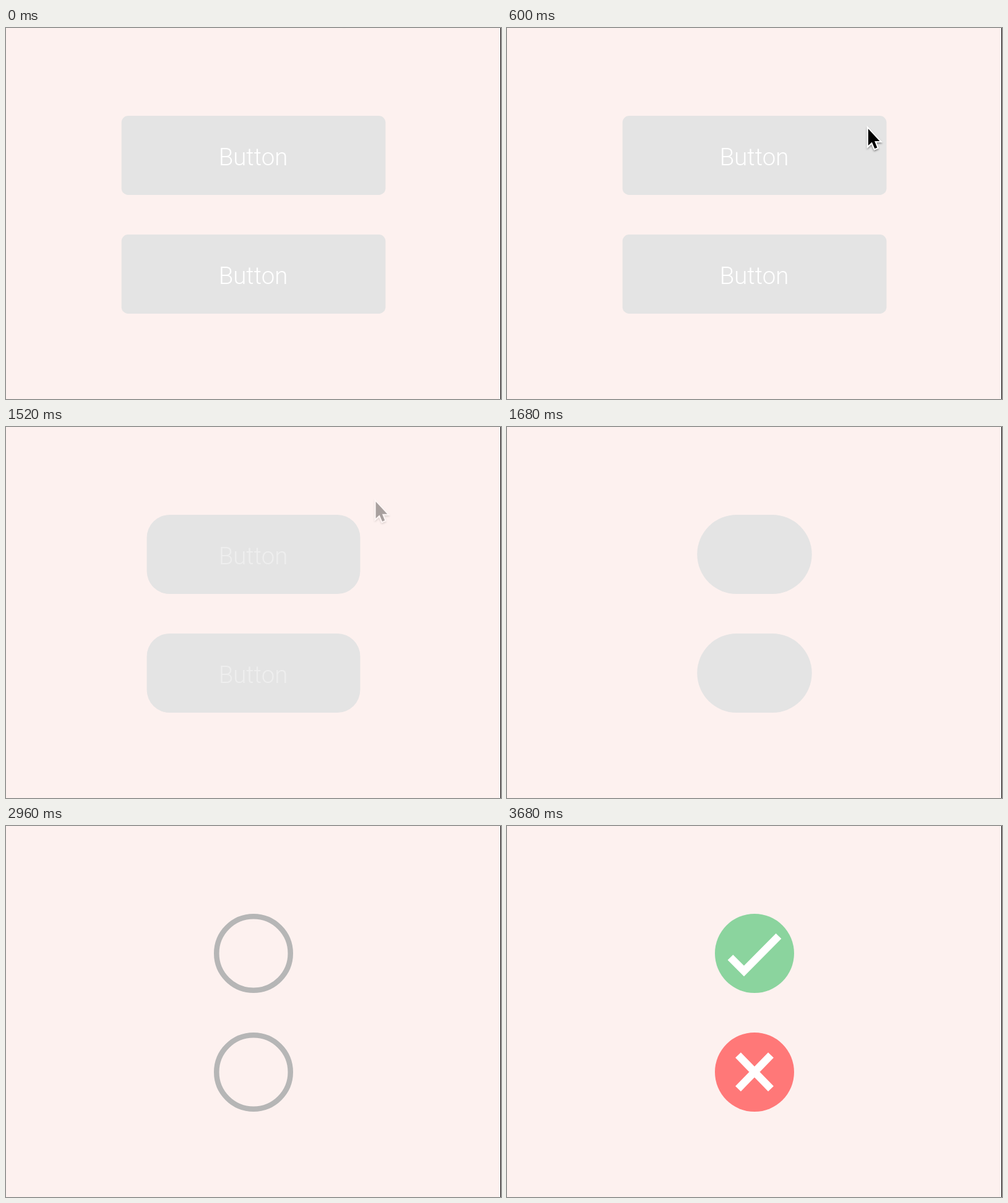
These frames come from a looping animation (800x600 px, 4.96 s). An HTML page:

```html
<!DOCTYPE html>
<html lang="en">
<head>
<meta charset="utf-8">
<title>Buttons</title>
<style>
  html, body { margin: 0; width: 100%; height: 100%; overflow: hidden; background: #fdf1ef; }
  svg { display: block; width: 800px; height: 600px; }
  text { font: 300 38.4px Roboto, "Liberation Sans", sans-serif; fill: #fff; text-anchor: middle; }
</style>
</head>
<body>
<svg viewBox="0 0 800 600">
  <defs>
    <filter id="shadow" x="-50%" y="-50%" width="200%" height="200%">
      <feDropShadow dx="0" dy="2" stdDeviation="1.6" flood-color="#000" flood-opacity=".4"/>
    </filter>
  </defs>
  <rect width="800" height="600" fill="#fdf1ef"/>
  <g id="buttons"></g>
  <g id="cursor">
    <path d="M0 0V27L6 21.5L10.5 32L14.5 30.3L10.3 20H18.5Z" filter="url(#shadow)"
          stroke="#fff" stroke-width="4" paint-order="stroke"/>
  </g>
  <rect x="799" width="1" height="600"/>
</svg>
<script>
const LOOP = 4960, STEP = 40;
const WIDE = 426.67, SIZE = 128;
const RING_WIDTH = 8.53, RING_RADIUS = (SIZE - RING_WIDTH) / 2;

const results = [
  { y: 206, color: '#8bd49e', mark: 'M-39 6.5L-17 28.5L39 -28' },
  { y: 398, color: '#ff7878', mark: 'M-26.5 -27.5L26.5 27M26.5 -27.5L-26.5 27' }
];

const cursor = document.getElementById('cursor');
const buttons = results.map(({ y, color, mark }) => {
  const group = document.createElementNS('http://www.w3.org/2000/svg', 'g');
  group.setAttribute('transform', `translate(400 ${y})`);
  group.innerHTML = `
    <rect y="${-SIZE / 2}" height="${SIZE}" fill="#e4e4e4"/>
    <text x="-.5" y="15.5">Button</text>
    <circle r="${RING_RADIUS}" fill="none" stroke="#b6b6b6" stroke-width="${RING_WIDTH}"
            pathLength="1" transform="rotate(180)"/>
    <g><circle r="${SIZE / 2}" fill="${color}"/>
    <path d="${mark}" fill="none" stroke="#fff" stroke-width="12.3"/></g>`;
  document.getElementById('buttons').append(group);
  const [box, label, ring, result] = group.children;
  return { box, label, ring, result };
});

const set = (node, attrs) => {
  for (const name in attrs) node.setAttribute(name, attrs[name]);
};
const progress = (t, start, duration) => Math.min(1, Math.max(0, (t - start) / duration));
const mix = (a, b, p) => a + (b - a) * p;
const inOut = p => p < .5 ? 2 * p * p : 1 - 2 * (1 - p) ** 2;
const out = (p, power) => 1 - (1 - p) ** power;

function drawCursor(t) {
  const enter = progress(t, 0, 760);
  const leave = progress(t, 1360, 240);
  const x = mix(536, 586, out(enter, 2)) + 15 * inOut(leave);
  const y = mix(-38, 165, out(enter, 3)) - 57 * inOut(leave);
  set(cursor, { transform: `translate(${x} ${y})`, opacity: 1 - leave });
}

function drawButton({ box, label, ring, result }, t) {
  const shrink = inOut(progress(t, 1335, 500));
  const width = mix(WIDE, SIZE, shrink);
  set(box, {
    x: -width / 2,
    width,
    rx: Math.min(SIZE / 2, mix(10.67, 106.67, shrink)),
    opacity: 1 - inOut(progress(t, 2105, 440))
  });
  set(label, { opacity: 1 - inOut(progress(t, 1340, 320)) });

  const load = progress(t, 2105, 728);
  const finish = inOut(progress(t, 3180, 500));
  set(ring, {
    'stroke-dasharray': load < 1 ? `${inOut(load)} 2` : 'none',
    opacity: finish < 1 ? load : 0
  });
  set(result, { opacity: finish });
}

function render(time) {
  const t = Math.floor(time % LOOP / STEP) * STEP;
  drawCursor(t);
  buttons.forEach(button => drawButton(button, t));
}

const start = performance.now();
function tick() {
  render(performance.now() - start);
  requestAnimationFrame(tick);
}
tick();
</script>
</body>
</html>
```
